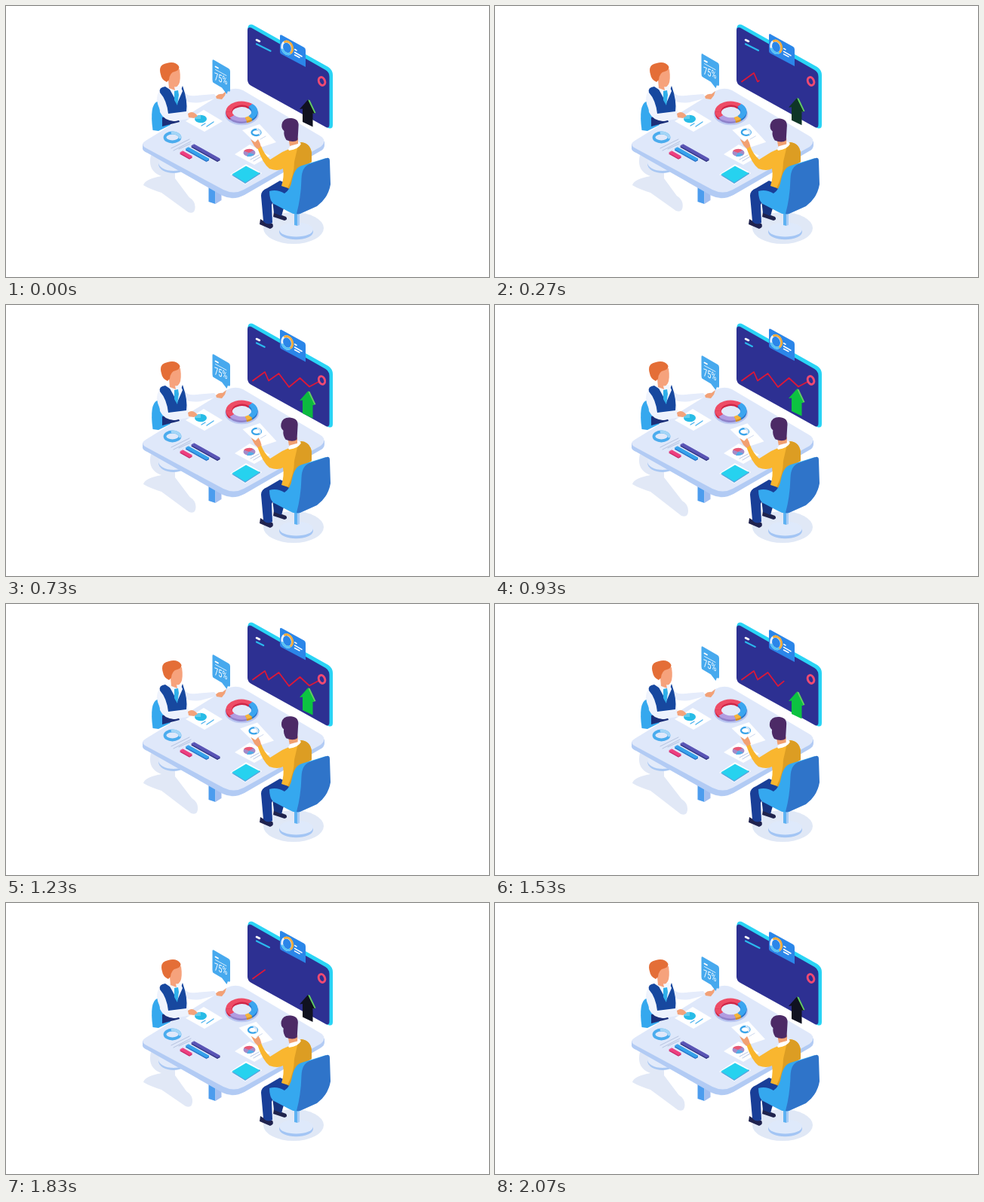
Recreate the animation shown at these times as an HTML page. Size 640 by 360 pixels, loop 2110 ms.

```html
<!DOCTYPE html>
<html lang="en">
<head>
<meta charset="utf-8">
<title>Team meeting</title>
<style>
  html, body { margin: 0; width: 100%; height: 100%; overflow: hidden; background: #fff; }
  svg { display: block; width: 100vw; height: 100vh; }
  text { font: 400 14px Roboto, Inter, sans-serif; }
  .line { fill: none; stroke-linecap: round; stroke-linejoin: round; }
</style>
</head>
<body>
<svg viewBox="0 0 640 360">
  <!-- floor shadows -->
  <path id="floorShadow" fill="#e1e8f6"/>
  <ellipse cx="381" cy="295" rx="40" ry="21" fill="#e0e8f6"/>

  <!-- wall screen -->
  <path fill="#2ad4f5" d="M320 33Q320 21 329 26L427 81Q433 85 433 92V158Q433 164 427 162L322 102Z"/>
  <path fill="#2d3092" d="M320 33Q320 26 327 30L423.500 85Q428.500 88 428.500 94V157Q428.500 163 424 161L325 106Q320 103 320 98Z"/>
  <path class="line" stroke="#fff" stroke-width="2.6" d="M332 45L336 47"/>
  <path id="caption" class="line" stroke="#2bb9ee" stroke-width="2.2"/>
  <path id="graph" class="line" stroke="#dc1738" stroke-width="1.8" pathLength="1"
        d="M327 100.500L343 89L348 100.500L361.500 91L375 109L389.500 97L402 108.500L418 100"/>
  <g id="marker"><ellipse rx="4" ry="5.6" transform="rotate(-22)" fill="#2d3092" stroke="#f04a72" stroke-width="3"/></g>
  <g id="topCard">
    <path fill="#2b86e9" d="M363 40Q363 37 366 39L395 55Q397 56 397 59V81L365 64Q363 63 363 61Z"/>
    <g class="line" stroke-width="2.8" transform="translate(372.5 55.5) rotate(-22)">
      <ellipse rx="6.500" ry="8.500" stroke="#e9f1fb"/>
      <path stroke="#f6ac3d" d="M0 -8.500A6.500 8.500 0 0 1 1 8.500"/>
      <path stroke="#55c3f5" d="M-6.500 0A6.500 8.500 0 0 0 0 8.500"/>
    </g>
    <path class="line" stroke="#fff" stroke-width="1.5" d="M382.500 57.500L385 59M382.500 61.500L392 67M382.500 65L389 68.500"/>
  </g>

  <!-- left chair and its base -->
  <ellipse cx="222" cy="210" rx="20" ry="12" fill="#a9c8f3"/>
  <ellipse cx="222" cy="208" rx="20" ry="11" fill="#e3ebfa"/>
  <path fill="#35a8ee" d="M194.500 165Q190 132 200 127Q206 125 212 137L218 158L202 166Z"/>

  <!-- table -->
  <path fill="#4c9cee" d="M268.500 234H277.500V263L268.500 260Z"/>
  <path fill="#a4bff0" d="M277.500 234H285.500V258L277.500 263Z"/>
  <path fill="#b2cbf4" d="M181 183V190Q182 193 187 195L287 252Q301 259 316 251L416 193Q422 190 422 185V180Z"/>
  <path fill="#dfe8fa" d="M185 179L292 113Q303 107 314 112L417 173Q426 179 417 187L315 244Q302 251 288 244L186 189Q177 184 185 179Z"/>

  <!-- left man -->
  <path fill="#1b2f79" d="M207 148L226 144L230 154L207 160Z"/>
  <path fill="#f0f4fd" d="M212 108L202 115Q197 123 204 138Q208 150 223 153L244 149L242 141L238 120L231 107Z"/>
  <path fill="#e5ecfb" d="M234 112Q240 121 252 119L276 117L280 122L258 128Q245 130 236 125Z"/>
  <path fill="#17489f" d="M211 107Q202 108 204 115Q213 125 215 143L239 140Q241 126 234 106L229 119Z"/>
  <path fill="#f4f7ff" d="M215 107L231 106L234 113L227 129Z"/>
  <path fill="#2fb0ea" d="M223 113L228 112L229 118L227 132L223 125Z"/>
  <path fill="#edf2fd" d="M202 117Q199 126 204 136L212 145L242 142L244 149L223 153Q209 152 204 141Z"/>
  <path fill="#f2a177" d="M278 120Q282 116 287 117L292 113L290 119L286 124L279 123Z"/>
  <g id="leftHead">
    <path fill="#f6a27c" d="M214 88L230 84Q232 98 229 104Q226 109 223 107L224 112L216 109Z"/>
    <path fill="#e46e37" d="M205 91Q201 78 213 76Q224 73 229 80Q231 85 224 87Q217 88 216 98L213 101Q206 98 205 91Z"/>
  </g>

  <!-- things on the table -->
  <path fill="#fff" d="M238 153L262 138L287 153L263 167Z"/>
  <ellipse cx="258" cy="150" rx="8" ry="5.2" fill="#28bce7"/>
  <path fill="#64cded" d="M258 150V145A8 5 0 0 0 250 150Z"/>
  <path class="line" stroke="#4db3ed" stroke-width="1.4" d="M259 159L264 156M266 160L275 154"/>
  <path fill="#f3a37b" d="M241 143Q246 139 251 143L254 146L249 149L242 148Z"/>
  <g id="donut" transform="translate(312.5 140) scale(1 .64)">
    <circle cy="6" r="22.500" fill="#b9c6f1"/>
    <circle cy="2" r="19" fill="#e1e9fa"/>
  </g>
  <ellipse cx="220.500" cy="174.500" rx="10" ry="6" fill="none" stroke="#4bacee" stroke-width="3.8"/>
  <path class="line" stroke="#a3d5f7" stroke-width="3.8" stroke-linecap="butt" d="M220.500 168.500A10 6 0 0 1 230.500 174.500"/>
  <path class="line" stroke="#b6c3df" stroke-width="1" d="M219 189L243 177M222 192L245 180M229 190L244 183"/>
  <g id="bars" class="line"></g>
  <g id="sheet">
    <path fill="#fff" d="M313 165L336 157L358 181L337 188Z"/>
    <ellipse cx="331.500" cy="168" rx="6" ry="4" fill="none" stroke="#3aa4e9" stroke-width="2.3"/>
    <path class="line" stroke="#d4e6fa" stroke-width="2.3" d="M333 164Q338 166 336 170"/>
    <path class="line" stroke="#ccd8ee" d="M337 177L344 173"/>
  </g>
  <path fill="#fff" d="M303 197L323 184L350 199L329 211Z"/>
  <ellipse cx="322.500" cy="195" rx="8" ry="5" fill="#a58bc8"/>
  <path fill="#e95875" d="M322 195L315 192.500A8 5 0 0 1 328 191.500Z"/>
  <path fill="#50afe8" d="M322 195L329 197A8 5 0 0 1 319 199.700Z"/>
  <path class="line" stroke="#b9c6e5" d="M324 204L335 198M328 206L338 200"/>
  <path fill="#fff" d="M297 224L318 210L339 222L317 237Z"/>
  <path fill="#5aa5df" d="M298.500 224.500L317 236L337 223V221.500Z"/>
  <path fill="#26d2ef" d="M299.500 223.500L318 212.500L336 222L317 234.500Z"/>

  <!-- speech card -->
  <g id="speech">
    <path fill="#47a9ee" d="M273.500 2Q273.500 -1 276 1L295 12Q297 13 297 16V41Q297 44 294 42L292.500 46L286 37.500L275 31Q273.500 30 273.500 27Z"/>
    <path class="line" stroke="#fff" stroke-width="1.8" d="M277.500 9.500L281 11.500"/>
    <path class="line" stroke="#d9effd" stroke-width="1" d="M277.500 13.500L292 21.500"/>
    <text transform="matrix(.66 .26 0 1 276 27)" fill="#fff">75%</text>
  </g>

  <!-- growth arrow -->
  <g id="arrow">
    <path fill="#62cc62" d="M400 124.500L402.500 125L410.500 142L406 143Z"/>
    <path id="arrowFace" d="M400 124.500L409 143L406.500 142.500V160.500L393 154V136.500L389 137Z"/>
  </g>

  <!-- right man and chair -->
  <path fill="#a3c5f4" d="M362 297V300A22 10 0 0 0 407 300V297Z"/>
  <ellipse cx="384.500" cy="297" rx="22.500" ry="9.500" fill="#dee9fb"/>
  <path fill="#5fb2f2" d="M382 272H386V292L382 291Z"/>
  <path fill="#a9ccf5" d="M386 272H389V291L386 292Z"/>
  <path fill="#20244d" d="M355 273L363 277L371 280Q374 284 369 285L354 280Z"/>
  <path fill="#20234f" d="M337 283L345 288L353 289Q356 294 350 296L336 290Z"/>
  <path fill="#17347f" d="M353 258L369 265L365 279L355 275Z"/>
  <path fill="#193f98" d="M363 232L382 240L375 254L355 258L352 264L353 288Q346 292 341 286L338 252Q338 245 346 242Z"/>
  <path fill="#f9b62f" d="M375 190L391 181Q403 182 405 195V207L391 215L380 244L365 239Q369 227 367 216Q360 220 349 216Q340 209 333 188L338 186Q342 197 350 204L366 194Z"/>
  <path fill="#dc9d23" d="M387 185L391 181Q403 182 405 195V207L391 215L380 244L373 242Q382 224 382 207Z"/>
  <path fill="#fff" d="M374 190Q378 183 387 180L391 183Q388 190 375 192Z"/>
  <path id="hand" fill="#f2a071" d="M333 190L329 186L324 177L330 181L334 177L336.500 182L338 187Z"/>
  <g id="rightHead">
    <path fill="#f1a071" d="M374 174L387 175L387 183L376 186Z"/>
    <path fill="#4c2a66" d="M365.500 157Q367.500 148 378.500 149Q389 150 387.500 161L386.500 178Q381 182 371.500 178Q367.500 172 368.500 166Q364.500 163 365.500 157Z"/>
  </g>
  <path fill="#35a8ef" d="M349 246Q359 243 369 249Q377 244 379 231Q382 215 392 212L424 202L410 258L390 276Q382 278 374 273L357 264Q349 261 349 246Z"/>
  <path fill="#2f74c9" d="M391.500 229Q392 214 402 210L425 202Q429 201 429 206L430 237Q427 255 412 266L392 275Q389 276.500 385 276Q391 254 391.500 229Z"/>
</svg>
<script>
const LOOP = 2110;
const TAU = 2 * Math.PI;
const $ = id => document.getElementById(id);

function add(parent, tag, attrs) {
  const node = document.createElementNS('http://www.w3.org/2000/svg', tag);
  for (const key in attrs) node.setAttribute(key, attrs[key]);
  parent.append(node);
}

// Ring segments: start and end in degrees, top colour, side colour.
const segments = [
  [178, 312, '#ee4c66', '#cf2546'],
  [312, 408, '#3ba5ef', '#2979cf'],
  [408, 432, '#f5b43b', '#d28d27'],
  [72, 142, '#b19ce0', '#8f83cb'],
  [142, 178, '#ee4c66', '#cf2546']
];
function arc(from, to, dy, stroke) {
  const point = deg => `${17 * Math.cos(deg * TAU / 360)} ${17 * Math.sin(deg * TAU / 360) + dy}`;
  add($('donut'), 'path', {
    d: `M${point(from)}A17 17 0 0 1 ${point(to)}`, fill: 'none', stroke, 'stroke-width': 8
  });
}
for (const [from, to, , side] of segments) for (const dy of [4, 2]) arc(from, to, dy, side);
for (const [from, to, top] of segments) arc(from, to, 0, top);

// Isometric bars: start x, y, length in x, top colour, side colour.
for (const [x, y, length, top, side] of [
  [231, 195, 12, '#ee3f80', '#c92a68'],
  [238.5, 190, 27, '#36a2eb', '#2670c8'],
  [246, 186, 34, '#5954b5', '#2f327f']
]) {
  const end = `l${length} ${length * .56}l3.5 -2l${-length} ${-length * .56}z`;
  add($('bars'), 'path', { d: `M${x} ${y + 1.5}${end}`, fill: side, stroke: side });
  add($('bars'), 'path', { d: `M${x} ${y}${end}`, fill: top, stroke: top });
}

// Linear interpolation through [time, value] pairs.
function track(t, keys) {
  let [t0, v0] = keys[0];
  for (const [t1, v1] of keys) {
    if (t <= t1) return t1 === t0 ? v1 : v0 + (v1 - v0) * (t - t0) / (t1 - t0);
    [t0, v0] = [t1, v1];
  }
  return v0;
}
const move = (id, x, y, extra = '') => $(id).setAttribute('transform', `translate(${x} ${y})${extra}`);

function draw(t) {
  const wave = Math.cos(TAU * t / LOOP);
  const sway = (1 - Math.cos(TAU * 2 * t / LOOP)) / 2;

  const shown = track(t, [[100, 0], [720, 1], [1316, 1], [1928, 0]]);
  $('graph').setAttribute('stroke-dasharray', `${shown} 2`);
  $('graph').style.visibility = shown > 0 ? 'visible' : 'hidden';
  const width = 13.5 + 5 * wave;
  $('caption').setAttribute('d', `M332 50.500l${width} ${width / 2}`);

  const pulse = track(t, [[0, 1], [300, 1], [530, .8], [760, 1]]);
  move('marker', 418.5, 100, ` scale(${pulse})`);
  move('topCard', 0, -3.5 + 3.5 * wave);

  const rise = track(t, [[0, 0], [250, 2], [530, 7], [930, 13], [1230, 13], [1530, 8], [1830, 2.5], [2080, 0]]);
  const glow = track(t, [[180, 0], [530, .78], [800, 1], [1530, 1], [1800, 0]]);
  move('arrow', 0, -rise);
  const mix = (dark, bright) => Math.round(dark + (bright - dark) * glow);
  $('arrowFace').setAttribute('fill', `rgb(${mix(16, 12)},${mix(18, 195)},${mix(32, 65)})`);

  const speechY = track(t, [[0, 71], [380, 60], [530, 63], [930, 67], [1080, 70], [1230, 67], [1530, 56], [1650, 56], [1830, 62], [2070, 71]]);
  move('speech', 0, speechY);
  const nod = track(t, [[0, 0], [530, 2], [930, 0], [1230, 3], [1530, 4], [1830, 2], [2070, 0]]);
  move('leftHead', nod, 0);
  move('rightHead', -1.5 * sway, sway);
  move('hand', sway, -sway);

  const slide = track(t, [[0, 0], [530, 2.5], [930, -1.5], [1230, -3], [1530, .5], [1830, -4.5], [2070, 0]]);
  move('sheet', slide, -slide * .15);

  const reach = track(t, [[0, 4], [530, 0], [930, 10], [1230, 8], [1530, 9], [1830, 0], [2070, 5], [LOOP, 4]]);
  const x = 247 + reach * .9, y = 270 + reach;
  $('floorShadow').setAttribute('d',
    `M192 198Q187 219 206 226Q184 230 182 238Q190 243 206 248L${x - 9} ${y}Q${x} ${y + 3} ${x} ${y - 7}Q${x} ${y - 15} ${x - 8} ${y - 20}L224 229V221L236 216Z`);
}

const start = performance.now();
function tick() {
  draw((performance.now() - start) % LOOP);
  requestAnimationFrame(tick);
}
draw(0);
requestAnimationFrame(tick);
</script>
</body>
</html>
```
